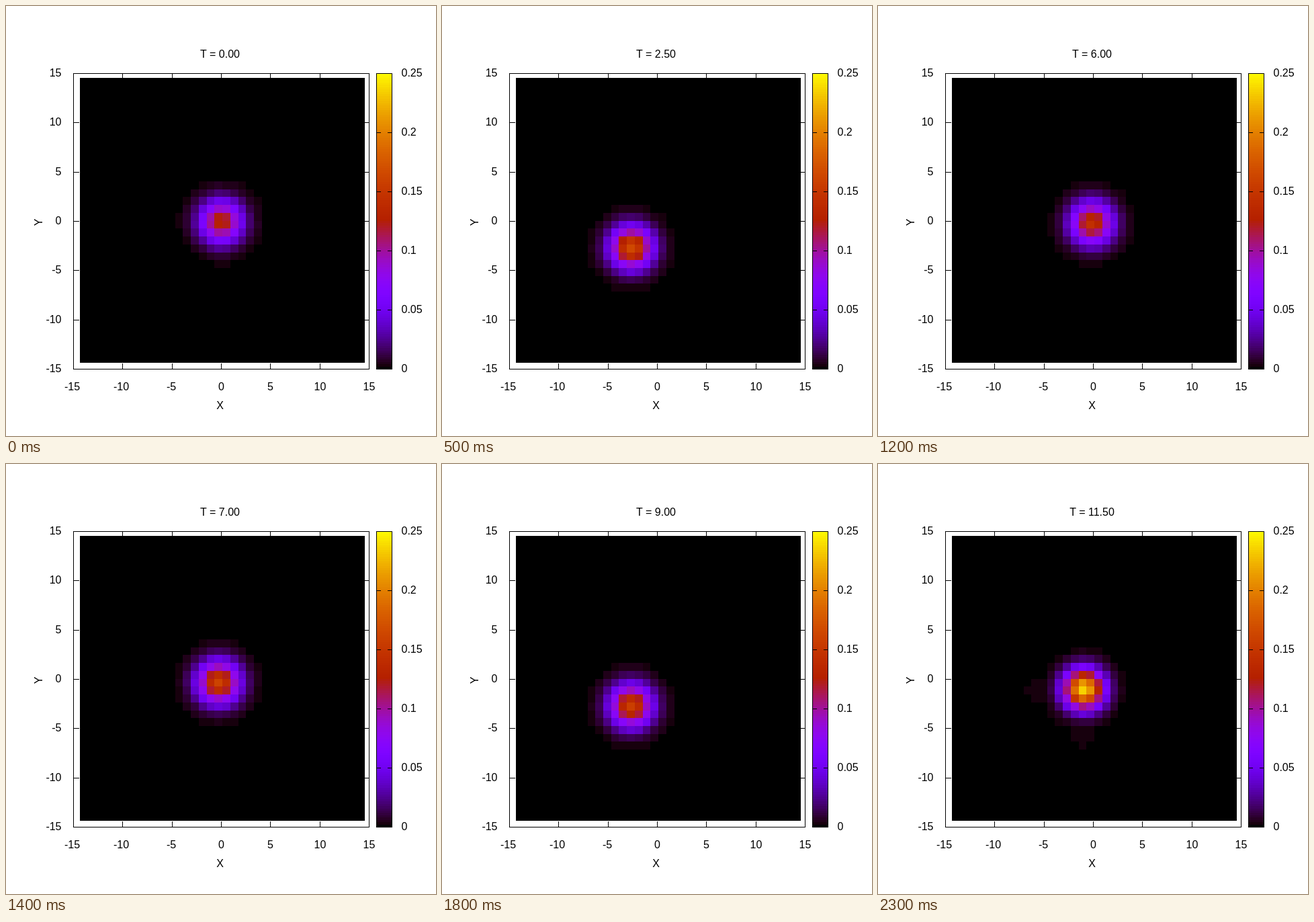
Write an HTML page that moves like this. It is 640x640 px and loops after 2.4 s.

```html
<!DOCTYPE html>
<html lang="en">
<head>
<meta charset="utf-8">
<title>Density plot</title>
<style>
  html, body { margin: 0; width: 100%; height: 100%; overflow: hidden; background: #fff; }
  svg { display: block; width: 640px; height: 640px; }
  text { font: 16px "Liberation Sans", Arial, sans-serif; fill: #000; }
  rect, path { shape-rendering: crispEdges; }
  path { fill: none; stroke: #000; stroke-width: 1; }
</style>
</head>
<body>
<svg id="plot" viewBox="0 0 640 640"></svg>
<script>
const svg = document.getElementById('plot');
const LOOP = 2400, STEP = 100, DT = 0.5;
const CELL = 0.8 * 440 / 30;
const LEVELS = 128, MAX = 0.25;
const COLS = 14, ROWS = 14;
const LEFT = 216.55, BOTTOM = 425.2;

function add(tag, attrs, content) {
  const node = document.createElementNS('http://www.w3.org/2000/svg', tag);
  for (const key in attrs) node.setAttribute(key, attrs[key]);
  if (content !== undefined) node.textContent = content;
  svg.appendChild(node);
  return node;
}
const box = (x, y, width, height, fill) => add('rect', { x, y, width, height, fill });
const label = (x, y, content, anchor = 'middle') =>
  add('text', { x, y, 'text-anchor': anchor }, content);

// Palette: red = sqrt(g), green = g^3, blue = sin(2 pi g)
function shade(level) {
  const g = level / LEVELS;
  const byte = v => Math.round(255 * Math.max(0, Math.min(1, v)));
  return `rgb(${byte(Math.sqrt(g))},${byte(g ** 3)},${byte(Math.sin(2 * Math.PI * g))})`;
}

// Plot area and heat map cells
box(110, 107, 424, 424, '#000');
const cells = [];
const edgeX = i => Math.round(LEFT + CELL * i);
const edgeY = j => Math.round(BOTTOM - CELL * (ROWS - j));
for (let j = 0; j < ROWS; j++) {
  for (let i = 0; i < COLS; i++) {
    const x = edgeX(i), y = edgeY(j);
    cells.push({
      node: box(x, y, edgeX(i + 1) - x, edgeY(j + 1) - y, '#000'),
      x: LEFT + CELL * (i + 0.5),
      y: BOTTOM - CELL * (ROWS - j - 0.5)
    });
  }
}

// Colour bar
for (let n = 0; n < LEVELS; n++) {
  const top = Math.round(540 - 440 * (n + 1) / LEVELS);
  box(551, top, 24, Math.round(540 - 440 * n / LEVELS) - top, shade(n + 1 === LEVELS ? LEVELS : n));
}
let lines = 'M100.5 100.5H540.5V540.5H100.5ZM551.5 100.5H574.5V540.5H551.5Z';
for (let n = 0; n <= 5; n++) {
  const y = 540 - 88 * n;
  if (n > 0 && n < 5) lines += `M551 ${y + 0.5}h7M568 ${y + 0.5}h7`;
  label(588.5, y + 5, String(n * 5 / 100), 'start');
}

// Axes
for (let v = -15; v <= 15; v += 5) {
  const x = Math.round(320 + v * 440 / 30), y = Math.round(320 - v * 440 / 30);
  if (Math.abs(v) < 15) {
    lines += `M${x + 0.5} 100v9m0 423v9M100 ${y + 0.5}h9m423 0h9`;
  }
  label(x + (v < -5 ? -1.5 : v < 0 ? -1 : 0.5), 572, v);
  label(82.5, y + 5, v, 'end');
}
add('path', { d: lines });
label(318.5, 600, 'X');
add('text', { transform: 'translate(54 322) rotate(-90)', 'text-anchor': 'middle' }, 'Y');
const title = label(318.5, 77, '');

// Packet swinging along the diagonal while its height pulses at twice the rate
function packet(T) {
  const phase = 0.985 * T;
  const late = Math.max(0, (T - 10) / 1.5) ** 2;
  const shift = 21 * (1 - Math.cos(phase)) + 1.6 * Math.exp(-(((T - 4) / 2.2) ** 2));
  return {
    x: 320.5 - shift,
    y: 321 + shift,
    peak: 0.175 - 0.042 * Math.cos(2 * phase) + 0.03 * late,
    spread: 2 * (3.48 - 0.6 * late),
    tail: 0.0035 * late
  };
}

function density(p, x, y) {
  const dx = (x - p.x) / CELL, dy = (y - p.y) / CELL;
  const bump = (cx, cy, w) => Math.exp(-((dx - cx) ** 2 + (dy - cy) ** 2) / w);
  return Math.max(
    p.peak * bump(0, 0, p.spread),
    p.tail * bump(-5.7, 0.25, 4.7),
    p.tail * bump(-0.25, 5.7, 4.7)
  );
}

let shown = -1;
function draw(ms) {
  const step = Math.floor((ms % LOOP) / STEP);
  if (step !== shown) {
    shown = step;
    const T = step * DT, p = packet(T);
    title.textContent = 'T = ' + T.toFixed(2);
    for (const c of cells) {
      const level = Math.floor(density(p, c.x, c.y) / MAX * LEVELS);
      c.node.setAttribute('fill', shade(level));
    }
  }
}

const start = performance.now();
function tick() {
  draw(performance.now() - start);
  requestAnimationFrame(tick);
}
tick();
</script>
</body>
</html>
```
